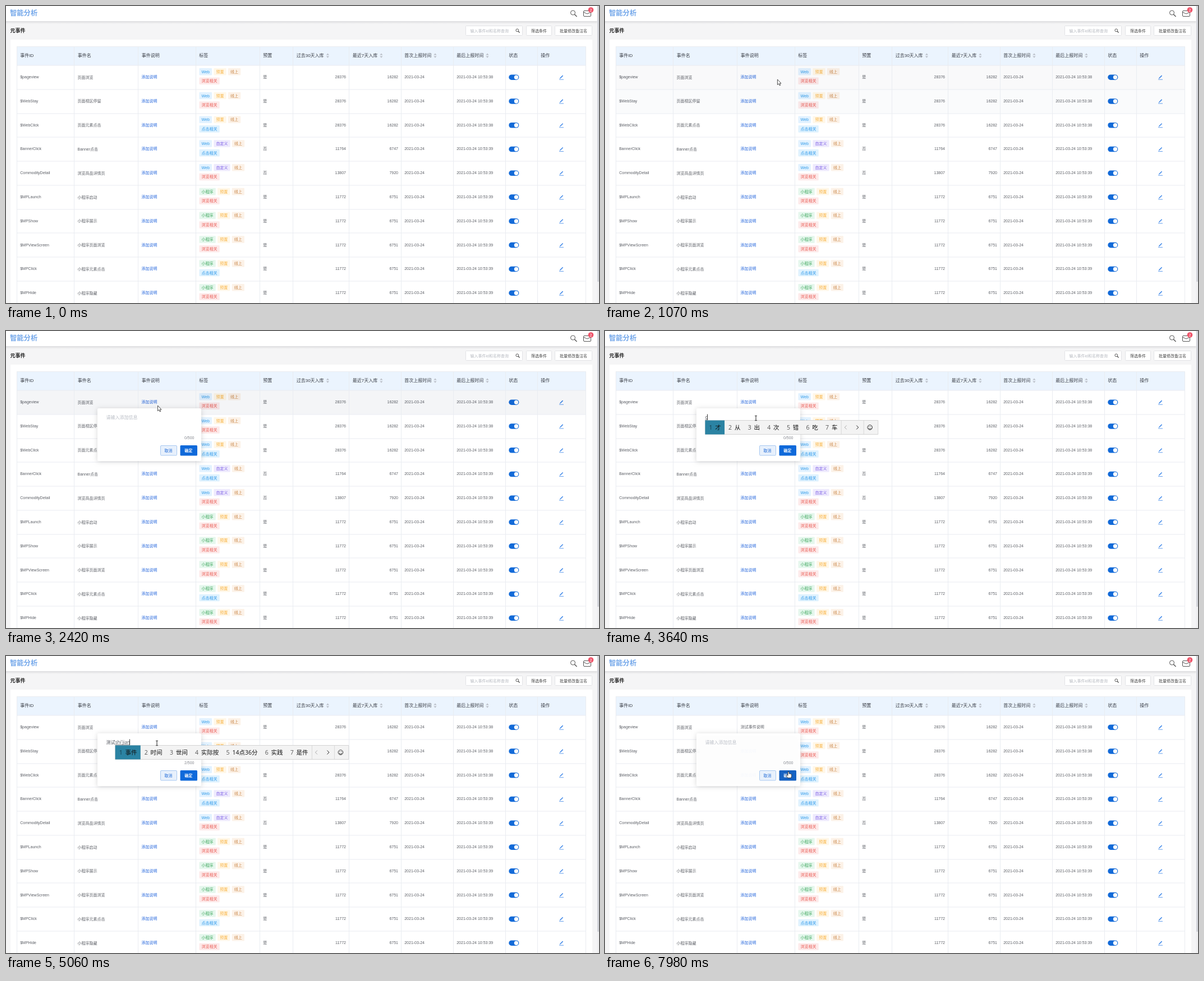
Write an HTML page with a canvas that moves like this. It is 1057 px wide and 530 px high and loops after 8000 ms.

```html
<!DOCTYPE html>
<html lang="zh-CN">
<head>
<meta charset="utf-8">
<title>元事件</title>
<style>
html, body { margin: 0; width: 100%; height: 100%; overflow: hidden; background: #fff; }
canvas { display: block; }
</style>
</head>
<body>
<canvas id="stage" width="1057" height="530"></canvas>
<script>
const ctx = document.getElementById('stage').getContext('2d');
const LOOP = 8000;
const SANS = '"Liberation Sans", "Noto Sans CJK SC", "Noto Sans CJK", sans-serif';
const UI = '"Open Sans", "Noto Sans CJK SC", "Noto Sans CJK", sans-serif';

const EDGES = [19, 121.5, 235.5, 338, 452, 511.5, 611.5, 704, 797, 890, 947, 1033];
const HEADS = ['事件ID', '事件名', '事件说明', '标签', '预置', '过去30天入库', '最近7天入库',
  '首次上报时间', '最后上报时间', '状态', '操作'];
const TOP = 106, PITCH = 42.78;
const TAGS = {
  'Web': ['#e2f2ff', '#2f9ae8'],
  '预置': ['#fff7e8', '#f8b240'],
  '线上': ['#fcf2e8', '#c98748'],
  '自定义': ['#eeeafd', '#7b5ce5'],
  '小程序': ['#e5f7ed', '#3ca65b'],
  '浏览相关': ['#fdeaea', '#e95850'],
  '点击相关': ['#dff2fe', '#2896ea']
};
// id, name, first two tags, related tag, preset, 30 days, 7 days
const ROWS = [
  ['$pageview', '页面浏览', 'Web 预置', '浏览', '是', 28376, 16282],
  ['$WebStay', '页面视区停留', 'Web 预置', '浏览', '是', 28376, 16282],
  ['$WebClick', '页面元素点击', 'Web 预置', '点击', '是', 28376, 16282],
  ['BannerClick', 'Banner点击', 'Web 自定义', '点击', '否', 11764, 6747],
  ['CommodityDetail', '浏览商品详情页', 'Web 自定义', '浏览', '否', 13807, 7920],
  ['$MPLaunch', '小程序启动', '小程序 预置', '浏览', '是', 11772, 6751],
  ['$MPShow', '小程序展示', '小程序 预置', '浏览', '是', 11772, 6751],
  ['$MPViewScreen', '小程序页面浏览', '小程序 预置', '浏览', '是', 11772, 6751],
  ['$MPClick', '小程序元素点击', '小程序 预置', '点击', '是', 11772, 6751],
  ['$MPHide', '小程序隐藏', '小程序 预置', '浏览', '是', 11772, 6751]
];

// pointer: time, x, y
const PATH = [
  [50, 372, 536], [830, 330, 178], [945, 316, 148], [1070, 307.5, 131], [1570, 261, 121],
  [1750, 261, 121], [1810, 266, 126], [2100, 266, 126], [2420, 270.5, 133], [2690, 265, 152],
  [2790, 269, 155.5], [7240, 269, 155.5], [7640, 327, 206], [8000, 327, 206]
];

const CE = '测 侧 策 册 厕 恻 恻';
const CESHI = '测试 侧室 测时 策士 侧视 厕室 测式';
const SH = '是 上 时 说 事 手 使';
const SHIJIAN = '事件 时间 世间 实际按 14点36分 实践 是件';
const SHIJ = '世界 时间 事件 实际 设计 数据 时机';
const SHUOMING = '说明 说名 书名 硕明 数名 署名 说命';
// typing: time, committed text, composition, candidates
const TYPING = [
  [0, '', '', ''],
  [3640, '', 'c', '才 从 出 次 错 吃 车'], [3750, '', 'ce', CE],
  [3950, '', "ce's", CESHI], [4040, '', "ce'sh", CESHI], [4130, '', "ce'shi", CESHI],
  [4210, '', "ce'shi", ''], [4250, '测试', '', ''],
  [4400, '测试', 's', SH], [4550, '测试', 'sh', SH], [4750, '测试', 'shi', '是 时 事 使 市 十 式'],
  [4850, '测试', "shi'j", SHIJ], [4920, '测试', "shi'ji", SHIJ], [5000, '测试', "shi'jia", SHIJ],
  [5060, '测试', "shi'jian", SHIJIAN], [5380, '测试', "shi'jian", ''], [5410, '测试事件', '', ''],
  [5520, '测试事件', 's', SH], [5610, '测试事件', 'sh', SH],
  [5790, '测试事件', 'shu', '书 数 树 属 术 输 熟'], [5890, '测试事件', 'shuo', '说 硕 朔 烁 铄 妁 搠'],
  [6090, '测试事件', "shuo'm", SHUOMING], [6130, '测试事件', "shuo'ming", SHUOMING],
  [6390, '测试事件', "shuo'ming", ''], [6420, '测试事件说明', '', ''], [7900, '', '', '']
];
const OPEN = 1970, SAVED = 7900, CLOSE = 7970;

const clamp = v => Math.max(0, Math.min(1, v));
const within = (p, x, y, w, h) => p.x >= x && p.x <= x + w && p.y >= y && p.y <= y + h;

function rect(x, y, w, h, fill, stroke, r = 0) {
  ctx.beginPath();
  ctx.roundRect(x, y, w, h, r);
  if (fill) { ctx.fillStyle = fill; ctx.fill(); }
  if (stroke) { ctx.strokeStyle = stroke; ctx.lineWidth = 1; ctx.stroke(); }
}

function disc(x, y, r, fill) {
  ctx.beginPath();
  ctx.arc(x, y, r, 0, 7);
  ctx.fillStyle = fill;
  ctx.fill();
}

function line(color, width, ...pts) {
  ctx.beginPath();
  for (let i = 0; i < pts.length; i += 2) ctx.lineTo(pts[i], pts[i + 1]);
  ctx.strokeStyle = color;
  ctx.lineWidth = width;
  ctx.stroke();
}

// y is the middle of the glyphs; returns the width
function text(s, x, y, size, color, { align = 'left', weight = 400, family = SANS } = {}) {
  ctx.font = `${weight} ${size}px ${family}`;
  ctx.textAlign = align;
  ctx.fillStyle = color;
  ctx.fillText(s, x, y + size * 0.36);
  return ctx.measureText(s).width;
}

function lens(x, y, r, color, width) {
  ctx.beginPath();
  ctx.arc(x, y, r, 0, 7);
  ctx.strokeStyle = color;
  ctx.lineWidth = width;
  ctx.stroke();
  line(color, width * 1.4, x + r * 0.75, y + r * 0.75, x + r * 1.75, y + r * 1.75);
}

function pointer(t) {
  if (t < PATH[0][0]) return null;
  const i = Math.max(1, PATH.findIndex(k => k[0] >= t));
  const [a, b] = [PATH[i - 1], PATH[i]];
  const u = clamp((t - a[0]) / (b[0] - a[0]));
  return { x: a[1] + (b[1] - a[1]) * u, y: a[2] + (b[2] - a[2]) * u };
}

const inPanel = (p, t) => t >= OPEN && within(p, 163, 138, 185, 94);

function rowAt(t) {
  const p = pointer(t);
  if (!p || inPanel(p, t)) return -1;
  return Math.floor((p.y - TOP) / PITCH);
}

// linear 250 ms fade: share of recent time spent over the row
function hoverShares(t) {
  const shares = new Array(ROWS.length).fill(0);
  for (let k = 0; k < 25; k++) {
    const r = rowAt(t - k * 10);
    if (r >= 0 && r < ROWS.length) shares[r] += 1 / 25;
  }
  return shares;
}

function drawChrome() {
  rect(0, 0, 1057, 530, '#f5f5f6');
  const g = ctx.createLinearGradient(0, 27, 0, 32);
  g.addColorStop(0, '#dcdcde');
  g.addColorStop(1, '#f5f5f6');
  rect(0, 27, 1057, 5, g);
  rect(0, 0, 1057, 27, '#fff');
  text('智能分析', 7, 13, 12.3, '#73a7ea', { weight: 700 });
  lens(1010.5, 12, 4, '#555', 1);
  rect(1029.5, 8.5, 13, 10, '#fff', '#555', 1.5);
  line('#555', 1, 1029.5, 11, 1036, 14, 1042.5, 11);
  disc(1042.5, 7, 4.8, '#ee5268');
  text('2', 1042.5, 7, 7, '#fff', { align: 'center' });

  text('元事件', 7.5, 43.5, 9, '#222', { weight: 700 });
  rect(819.5, 35.5, 101, 17, '#fff', '#e2e3e6', 1);
  text('输入事件id和名称查询', 827.5, 44, 7, '#b7bac1');
  lens(911.3, 43.3, 2.4, '#444', 0.9);
  rect(927.5, 35.5, 45, 17, '#fff', '#e2e3e6', 1);
  text('筛选条件', 950, 44, 7, '#444', { align: 'center' });
  rect(978.5, 35.5, 66, 17, '#fff', '#e2e3e6', 1);
  text('批量修改备注名', 1011.5, 44, 7, '#444', { align: 'center' });

  rect(8, 60, 1037, 470, '#fff');
  rect(1053.5, 0, 3.5, 530, '#f0f0f1');
  rect(1054, 0, 3, 492, '#d2d4da');
}

function sortMark(x) {
  for (const s of [-1, 1]) {
    ctx.beginPath();
    ctx.moveTo(x - 2.6, 88.6 + s);
    ctx.lineTo(x + 2.6, 88.6 + s);
    ctx.lineTo(x, 88.6 + s * 4);
    ctx.fillStyle = '#b9bdc6';
    ctx.fill();
  }
}

function tag(name, x, y) {
  const [bg, fg] = TAGS[name];
  ctx.font = `7px ${SANS}`;
  const w = ctx.measureText(name).width + 8.2;
  rect(x, y - 6.3, w, 12.6, bg, null, 1);
  text(name, x + 4.1, y, 7, fg);
  return x + w + 3.4;
}

function pencil(x, y) {
  const blue = '#3c86e8';
  line(blue, 1.5, x - 2.2, y + 1.8, x + 2.6, y - 3);
  line(blue, 0.8, x - 3.4, y + 3, x - 2, y + 1.6);
  line(blue, 0.8, x - 3.8, y + 4.1, x + 4, y + 4.1);
}

function drawRow(row, i, hover, saved) {
  const [id, name, kinds, topic, preset, month, week] = row;
  const y = TOP + 20.6 + i * PITCH;
  const ink = '#5c5f66';
  const cell = (s, col) => text(s, EDGES[col] + 6.2, y, 7, ink);
  cell(id, 0);
  text(name, EDGES[1] + 6, y + 0.5, 7, ink);
  if (i === 0 && saved) cell('测试事件说明', 2);
  else text('添加说明', EDGES[2] + 6, y, 7, '#2365dc');
  let x = EDGES[3] + 6.5;
  for (const k of [...kinds.split(' '), '线上']) x = tag(k, x, y - 9.4);
  tag(topic + '相关', EDGES[3] + 6.5, y + 7.2);
  cell(preset, 4);
  text(month, 606, y, 7, ink, { align: 'right' });
  text(week, 699, y, 7, ink, { align: 'right' });
  cell('2021-03-24', 7);
  cell('2021-03-24 10:53:' + (i < 3 ? 38 : 39), 8);
  rect(896.3, y + 0.6 - 4.8, 18, 9.6, '#126ad8', null, 4.8);
  disc(909.5, y + 0.6, 3.7, '#fff');
  pencil(990, y + 0.5);
  if (hover > 0) {
    ctx.save();
    ctx.globalCompositeOperation = 'multiply';
    ctx.globalAlpha = hover;
    rect(19, TOP + i * PITCH, 1014, PITCH, '#f4f5f7');
    ctx.restore();
  }
}

function drawTable(t) {
  rect(19, 72, 1014, 34, '#ebf4fe');
  HEADS.forEach((h, i) => {
    const w = text(h, EDGES[i] + 6.2, 88.5, 8, '#3a3e46');
    if (i > 4 && i < 9) sortMark(EDGES[i] + 13 + w);
  });
  const shares = hoverShares(t);
  ROWS.forEach((r, i) => drawRow(r, i, shares[i], t >= SAVED));
  for (let i = 0; i < ROWS.length; i++) {
    rect(19, Math.round(TOP + i * PITCH) - 0.5, 1014, 1, '#e9ecf1');
  }
  for (const x of EDGES) rect(Math.floor(x), 72, 1, 458, '#e9ecf1');
  rect(19, 72, 1014, 1, '#e9ecf1');
}

function drawCandidates(x, list) {
  const size = 10.5, opt = { family: UI };
  const words = list.split(' ');
  ctx.font = `${size}px ${UI}`;
  const widths = words.map(w => ctx.measureText(w).width + 24.1);
  const full = widths.reduce((a, b) => a + b, 66);
  rect(x, 159.5, full, 25, '#f3f3f3', '#d4d4d4');
  rect(x, 159.5, widths[0], 25, '#2b83a3');
  words.forEach((w, i) => {
    text(i + 1, x + 7, 172, size, i ? '#555' : '#173f4f', opt);
    text(w, x + 17.8, 172, size, '#111', opt);
    x += widths[i];
  });
  line('#d8d8d8', 1, x + 0.5, 160, x + 0.5, 184);
  line('#aaa', 1, x + 10, 168.5, x + 6.5, 172, x + 10, 175.5);
  line('#222', 1, x + 27.5, 168.5, x + 31, 172, x + 27.5, 175.5);
  line('#d8d8d8', 1, x + 40.5, 160, x + 40.5, 184);
  const cx = x + 51.5;
  ctx.beginPath();
  ctx.arc(cx, 172, 4.3, 0, 7);
  ctx.moveTo(cx + 2.2, 173);
  ctx.arc(cx, 173, 2.2, 0, Math.PI);
  ctx.strokeStyle = '#222';
  ctx.lineWidth = 0.9;
  ctx.stroke();
  disc(cx - 1.6, 170.6, 0.7, '#222');
  disc(cx + 1.6, 170.6, 0.7, '#222');
}

function drawPanel(t, p) {
  const alpha = clamp((t - OPEN) / 200) * (1 - clamp((t - CLOSE) / 250));
  if (!alpha) return;
  const [, done, comp, list] = TYPING.filter(k => k[0] <= t).pop();
  ctx.save();
  ctx.globalAlpha = alpha;
  ctx.shadowColor = 'rgba(0,0,0,.16)';
  ctx.shadowBlur = 9;
  ctx.shadowOffsetY = 1;
  rect(163, 138, 185, 94, '#fff', null, 2);
  ctx.shadowColor = 'transparent';

  let x = 178.5;
  if (!done && !comp) text('请输入添加信息', x, 154, 8, '#b9bdc5');
  x += text(done, x, 154, 8.1, '#55585f', { family: UI });
  const start = x;
  x += text(comp, x, 154, 8.1, '#55585f', { family: UI });
  if (comp) rect(start, 158.3, x - start, 0.8, '#55585f');
  const caret = (t >= 2690 && t < 3230) || (t >= 3640 && t < 6930) || (t >= 7450 && t < 7750);
  if (caret) rect(Math.floor(x), 148.5, 1, 10.5, '#333');

  text(done.length + '/500', 335.5, 190.5, 7, '#85888f', { align: 'right' });
  rect(275.5, 204.5, 29, 17.5, '#e7f0fc', '#a8c8f1', 1.5);
  text('取消', 289.5, 213.3, 7, '#1a66d6', { align: 'center', weight: 500 });
  const over = p && within(p, 310.5, 204, 30.5, 18.5);
  rect(310.5, 204, 30.5, 18.5, over ? '#0d5bbf' : '#0f69da', null, 1.5);
  text('确定', 325.3, 213.3, 7, '#fff', { align: 'center', weight: 700 });
  if (list) drawCandidates(start, list);
  ctx.restore();
}

const ARROW = new Path2D('M0 0V9.6L2.2 7.6L3.8 11L5.3 10.3L3.8 7.1H6.6Z');
const HAND = new Path2D('M-1 0.8Q0 -0.5 1 0.8V4L2.6 4.2L4.2 4.7L5.6 5.4V8.4L4.6 11.6H-1.4L-3.8 7.4Q-3.8 5.6 -2.2 6.4L-1 7.4Z');

function drawPointer(p, t) {
  if (!p) return;
  const panel = inPanel(p, t);
  if (panel && within(p, 172, 145, 168, 52)) {
    const { x, y } = p;
    line('#222', 1, x, y - 4, x, y + 4);
    line('#222', 0.9, x - 2, y - 4.2, x + 2, y - 4.2);
    line('#222', 0.9, x - 2, y + 4.2, x + 2, y + 4.2);
    return;
  }
  const row = Math.floor((p.y - TOP) / PITCH);
  const link = !panel && within(p, 241, TOP + 15 + row * PITCH, 28.5, 11);
  const button = panel && within(p, 275, 204, 66, 18.5);
  const shape = link || button ? HAND : ARROW;
  ctx.save();
  ctx.translate(p.x, p.y);
  ctx.fillStyle = '#fff';
  ctx.strokeStyle = '#222';
  ctx.lineWidth = 0.8;
  ctx.fill(shape);
  ctx.stroke(shape);
  ctx.restore();
}

function draw(now) {
  const t = now % LOOP;
  const p = pointer(t);
  drawChrome();
  drawTable(t);
  drawPanel(t, p);
  drawPointer(p, t);
}

const begin = performance.now();
function tick() {
  draw(performance.now() - begin);
  requestAnimationFrame(tick);
}
tick();
</script>
</body>
</html>
```
